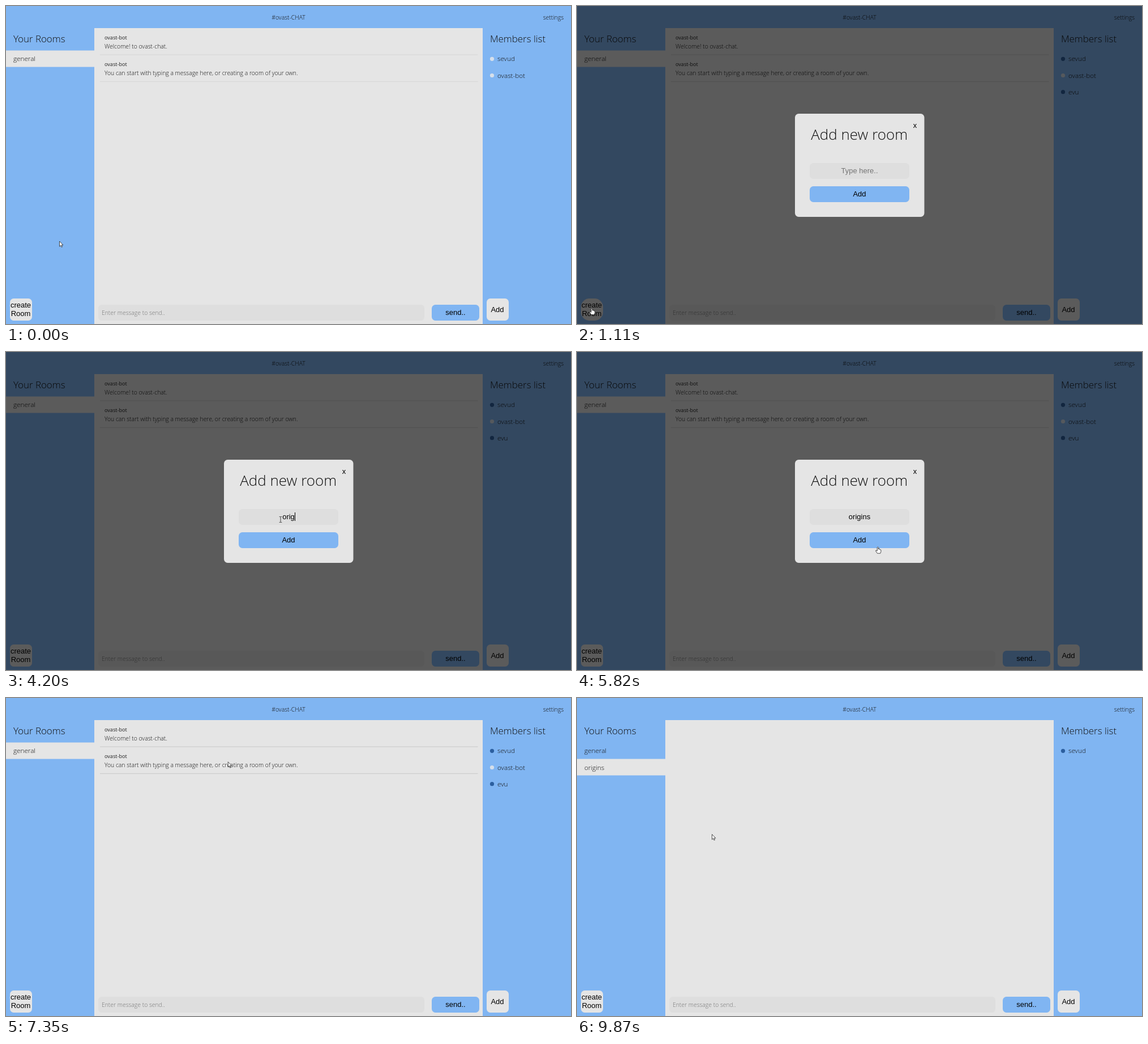
An HTML page for the animation above (9900 ms loop, 998x561 px).

```html
<!DOCTYPE html>
<html lang="en">
<head>
<meta charset="utf-8">
<title>Chat rooms</title>
<style>
  html, body { margin: 0; width: 100%; height: 100%; overflow: hidden; background: #80b5f2; }
  svg { display: block; width: 100%; height: 100%; }
  text { font-family: "Open Sans", sans-serif; font-weight: 300; fill: #111; white-space: pre; }
  .ui { font-family: "Liberation Sans", Arial, sans-serif; font-weight: 400; fill: #000; }
  .name { font-weight: 400; fill: #222; }
  .hint { fill: #757575; }
  .mid { text-anchor: middle; }
  .end { text-anchor: end; }
</style>
</head>
<body>
<svg id="stage" viewBox="0 0 998 561"></svg>
<script>
const LOOP = 9900;
const BLUE = '#80b5f2', GREY = '#e5e5e5', FIELD = '#dedede';
const ONLINE = '#2c5f9f', OFFLINE = '#d6dfea';

const rect = (x, y, w, h, fill, r = 0, id = '') =>
  `<rect id="${id}" x="${x}" y="${y}" width="${w}" height="${h}" rx="${r}" fill="${fill}"/>`;
const text = (x, y, size, str, cls = '', id = '') =>
  `<text id="${id}" x="${x}" y="${y}" font-size="${size}" class="${cls}">${str}</text>`;
const group = (id, ...parts) => `<g id="${id}">${parts.join('')}</g>`;

const message = (y, body) =>
  text(174, y + 19.5, 9.1, 'ovast-bot', 'name') +
  text(174, y + 35.5, 10.4, body) +
  `<rect class="rule" x="166" y="${y + 46.5}" width="667.5" height="1"/>`;

const member = (row, name) => group('member' + row,
  `<circle id="dot${row}" cx="858.5" cy="${93.3 + row * 29.2}" r="3.6" fill="${ONLINE}"/>`,
  text(868, 97.4 + row * 29.2, 11.7, name));

const page = [
  rect(0, 0, 998, 561, BLUE),
  rect(156, 39, 686, 522, GREY),
  text(499, 23.6, 10.4, '#ovast-CHAT', 'mid'),
  text(985, 23.6, 10.4, 'settings', 'end'),
  text(13, 63.8, 16.9, 'Your Rooms'),
  text(855, 63.8, 16.9, 'Members list'),
  rect(0, 78.5, 156, 29, GREY, 0, 'generalRow'),
  text(13, 97.4, 11.7, 'general'),
  group('newRoom', rect(0, 107.5, 156, 29, GREY), text(13, 126.6, 11.7, 'origins')),
  group('messages',
    message(39, 'Welcome! to ovast-chat.'),
    message(86.3, 'You can start with typing a message here, or creating a room of your own.')),
  member(0, 'sevud'), member(1, 'ovast-bot'), member(2, 'evu'),
  rect(163, 527, 576, 28, FIELD, 6),
  text(169, 544.5, 10.4, 'Enter message to send..', 'hint'),
  rect(752, 527, 84, 28, BLUE, 6.5),
  text(794, 545, 13, 'send..', 'ui mid'),
  rect(7, 516, 39, 39, GREY, 6.5, 'createButton'),
  text(26, 532, 13, 'create', 'ui mid'),
  text(26, 547, 13, 'Room', 'ui mid'),
  rect(849, 516, 39, 39, GREY, 6.5),
  text(868, 540, 13, 'Add', 'ui mid')
].join('');

const dialog = group('dialog',
  rect(0, 0, 998, 561, 'rgba(0,0,0,.6)'),
  rect(385, 190, 228.5, 182, GREY, 6.5),
  text(597, 215, 13, 'x', 'ui mid'),
  text(498.7, 236, 26, 'Add new room', 'mid'),
  rect(411, 277, 176, 28, FIELD, 6.5),
  text(499, 295.3, 13, 'Type here..', 'ui mid hint', 'hint'),
  text(499, 295.3, 13, '', 'ui mid', 'typed'),
  rect(499, 283, 1, 15, '#000', 0, 'caret'),
  rect(411, 318, 176, 28, BLUE, 6.5),
  text(499, 336, 13, 'Add', 'ui mid'));

const pointer = group('pointer',
  `<path id="arrow" d="M0 0V9.2L2.1 7.2L3.5 10.4L5 9.8L3.6 6.7H6.4Z" fill="#fff" stroke="#222" stroke-width=".8"/>`,
  `<path id="hand" d="M-1 1Q0-.8 1 1V4.3Q2-.2+3 4.7Q4 4 4.4 5.2Q5.6 4.7 5.6 6.2V8.6L4.5 11.5H-.8L-3.6 7.4Q-3.8 5.6-2.2 6.3L-1 7.4Z" fill="#fff" stroke="#222" stroke-width=".8"/>`,
  `<path id="beam" d="M-2.3-5H-.5L0-4.5L.5-5H2.3M0-4.5V4.5M-2.3 5H-.5L0 4.5L.5 5H2.3" fill="none" stroke="#333" stroke-width=".9"/>`);

document.getElementById('stage').innerHTML = page + dialog + pointer;

const el = id => document.getElementById(id);
const show = (id, on) => el(id).setAttribute('visibility', on ? 'visible' : 'hidden');
const set = (id, attr, value) => el(id).setAttribute(attr, value);
const within = (t, a, b) => t >= a && t < b;
const clamp = v => Math.min(1, Math.max(0, v));
const smooth = v => v * v * (3 - 2 * v);

// CSS "ease": cubic-bezier(.25, .1, .25, 1), solved by bisection
function ease(x) {
  let lo = 0, hi = 1;
  const at = (p, a, b) => 3 * a * p * (1 - p) ** 2 + 3 * b * p * p * (1 - p) + p ** 3;
  for (let i = 0; i < 20; i++) {
    const mid = (lo + hi) / 2;
    if (at(mid, .25, .25) < x) lo = mid; else hi = mid;
  }
  return at(lo, .1, 1);
}

// Pointer moves: start, end, destination
const START = [94.5, 415];
const MOVES = [
  [0, 780, 26, 533],
  [1110, 1800, 426, 295.5],
  [1980, 2130, 485, 295.5],
  [4980, 5520, 531.3, 343.7],
  [6450, 6750, 393, 113.5],
  [7320, 7830, 319.3, 38.5],
  [9540, 9870, 238.5, 240.5]
];

function pointerAt(t) {
  let [x, y] = START;
  for (const [from, to, toX, toY] of MOVES) {
    const p = smooth(clamp((t - from) / (to - from)));
    x += (toX - x) * p;
    y += (toY - y) * p;
  }
  return [x, y];
}

// The shape only updates once the pointer moves again
function pointerKind(x, y, t) {
  const inside = (l, top, r, b) => x > l && x < r && y > top && y < b;
  if (within(t, 1140, 6480)) {
    if (inside(411, 277, 587, 305)) return 'beam';
    if (inside(411, 318, 587, 346)) return 'hand';
  } else if (inside(7, 516, 46, 555)) return 'hand';
  return 'arrow';
}

const KEY_TIMES = [3450, 3660, 3840, 4200, 4260, 4350, 4530];

function draw(t) {
  const loaded = t >= 300;
  const switched = t >= 7980;
  const opened = t >= 9060;

  show('member0', !switched || opened);
  show('member1', !switched);
  show('member2', loaded && !switched);
  set('dot0', 'fill', loaded ? ONLINE : OFFLINE);
  set('dot1', 'fill', OFFLINE);
  show('messages', !opened);
  for (const line of document.querySelectorAll('.rule'))
    line.setAttribute('fill', loaded ? '#c8c8c8' : '#d5d5d5');

  show('newRoom', switched);
  set('generalRow', 'opacity', 1 - ease(clamp((t - 8040) / 300)));
  const hover = ease(clamp((t - 560) / 300)) - ease(clamp((t - 1140) / 300));
  set('createButton', 'rx', 6.5 + 8.5 * hover);

  const open = within(t, 1110, 5940);
  const count = KEY_TIMES.filter(k => t >= k).length;
  el('dialog').style.display = open ? '' : 'none';
  if (open) {
    el('typed').textContent = 'origins'.slice(0, count);
    el('hint').style.display = count ? 'none' : '';
    const half = count ? el('typed').getComputedTextLength() / 2 : 0;
    set('caret', 'x', Math.round(498.8 + half));
    el('caret').style.display = within(t, 2340, 2820) || within(t, 3300, 5040) ? '' : 'none';
  }

  const [x, y] = pointerAt(t);
  const kind = pointerKind(x, y, t);
  set('pointer', 'transform', `translate(${x} ${y})`);
  for (const k of ['arrow', 'hand', 'beam']) show(k, k === kind);
}

const began = performance.now();
function tick() {
  draw((performance.now() - began) % LOOP);
  requestAnimationFrame(tick);
}
tick();
</script>
</body>
</html>
```
